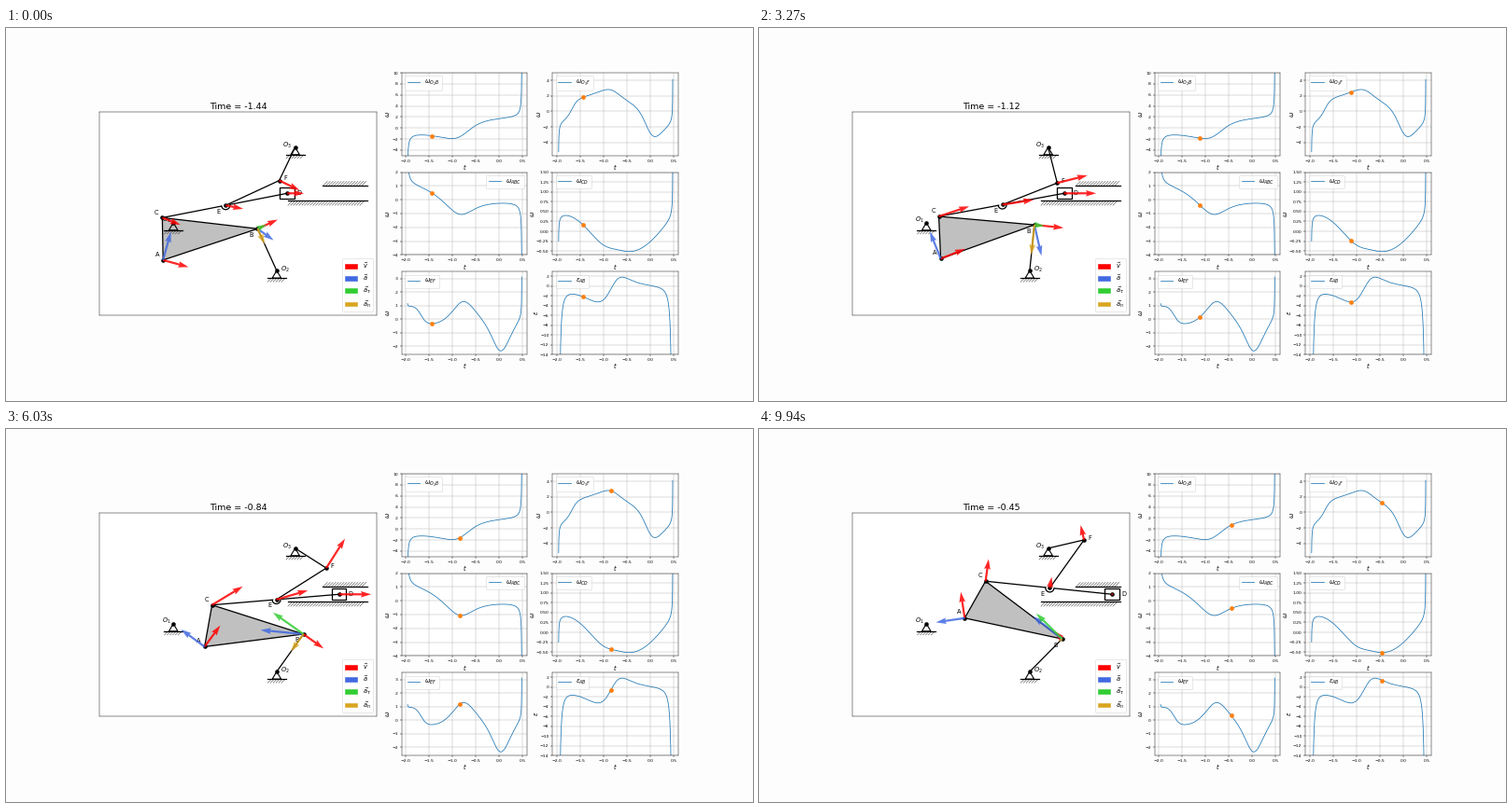
A matplotlib script that plays this animation: 800 px wide and 400 px high, repeating every 9970 ms.

```python
import numpy as np
import matplotlib.pyplot as plt
from matplotlib.animation import FuncAnimation
from matplotlib.collections import LineCollection
from matplotlib.lines import Line2D
from matplotlib.patches import Patch, Polygon, Rectangle

W, H, DPI = 800, 400, 40
FRAMES, LOOP_MS = 329, 9970
T_START, T_STEP = -1.4437, 1 / 330

# Linkage geometry in cm; points are complex numbers.
O1, O2, O3 = 0j, 56 - 26j, 66 + 41j
OMEGA, PHASE = 2, np.pi / 3
O1A, O2B, O3F = 21, 25, 20
AB, AC, BC, CD, CE, EF = 54, 23, 52, 69, 35, 32
SLIDE_Y = 16

plt.rcParams["font.family"] = "DejaVu Sans"
np.seterr(invalid="ignore")


def meet(p, q, rp, rq, side):
    """Intersection of two circles; side +1 lies left of p -> q."""
    d = q - p
    dist = np.abs(d)
    x = (rp**2 - rq**2 + dist**2) / (2 * dist)
    y = np.sqrt(rp**2 - x**2)
    return p + (x + 1j * side * y) * d / dist


def pose(t):
    """Positions of the joints A..F at time t."""
    a = O1 + O1A * np.exp(1j * (OMEGA * t + PHASE))
    b = meet(a, O2, AB, O2B, 1)
    c = meet(a, b, AC, BC, 1)
    drop = SLIDE_Y - c.imag
    d = c.real + np.sqrt(CD**2 - drop**2) + 1j * SLIDE_Y
    e = c + (d - c) * CE / CD
    f = meet(e, O3, EF, O3F, -1)
    return np.array([a, b, c, d, e, f])


def velocity(t, h=1e-5):
    return (pose(t + h) - pose(t - h)) / (2 * h)


def acceleration(t, h=1e-4):
    return (pose(t + h) - 2 * pose(t) + pose(t - h)) / h**2


def spin(arm, arm_vel):
    return (np.conj(arm) * arm_vel).imag / np.abs(arm) ** 2


def rates(t):
    """Angular velocities of O2B, O3F, ABC, CD and EF."""
    a, b, c, d, e, f = pose(t)
    va, vb, vc, vd, ve, vf = velocity(t)
    return np.array([
        spin(b - O2, vb), spin(f - O3, vf), spin(b - a, vb - va),
        spin(d - c, vd - vc), spin(f - e, vf - ve),
    ])


def all_rates(t, h=1e-4):
    eps = (rates(t + h)[2] - rates(t - h)[2]) / (2 * h)
    return np.vstack([rates(t), eps])


def xy(points):
    points = np.atleast_1d(points)
    return np.column_stack([points.real, points.imag])


def px_axes(fig, left, top, width, height):
    return fig.add_axes([left / W, 1 - (top + height) / H, width / W, height / H])


fig = plt.figure(figsize=(W / DPI, H / DPI), dpi=DPI, facecolor="#fefdfe")

# Graphs: label, quantity, y limits, tick step, legend corner
GRAPHS = [
    (r"$\omega_{O_2B}$", r"$\omega$", (-5, 10), 2, "upper left"),
    (r"$\omega_{O_3F}$", r"$\omega$", (-5.68, 4.97), 2, "upper left"),
    (r"$\omega_{ABC}$", r"$\omega$", (-4, 2), 1, "upper right"),
    (r"$\omega_{CD}$", r"$\omega$", (-0.6, 1.5), 0.25, "upper left"),
    (r"$\omega_{EF}$", r"$\omega$", (-2.62, 3.52), 1, "upper left"),
    (r"$\varepsilon_{AB}$", r"$\varepsilon$", (-14, 3), 2, "upper left"),
]

grid_t = np.linspace(-1.9632, 0.4819, 12000)
curves = all_rates(grid_t)
inside = (curves[1] > -5.2) & (curves[1] < 4.5)
grid_t, curves = grid_t[inside], curves[:, inside]

graph_axes = []
for i, (label, quantity, ylim, step, corner) in enumerate(GRAPHS):
    ax = px_axes(fig, (423.6, 585.3)[i % 2], 48 + 106.6 * (i // 2), 134.7, 88.8)
    ax.plot(grid_t, curves[i], label=label, lw=1.4)
    ax.set_xlim(-2.09, 0.6)
    ax.set_ylim(*ylim)
    ax.xaxis.set_major_locator(plt.MultipleLocator(0.5))
    ax.yaxis.set_major_locator(plt.MultipleLocator(step))
    ax.tick_params(labelsize=8)
    ax.set_xlabel("$t$", fontsize=12, labelpad=-1)
    ax.set_ylabel(quantity, fontsize=12, labelpad=0)
    ax.grid(True)
    ax.legend(loc=corner, fontsize=12)
    graph_axes.append(ax)

# The graphs never change, so they are rendered once and kept as a backdrop.
fig.canvas.draw()
backdrop = np.array(fig.canvas.buffer_rgba())
for ax in graph_axes:
    ax.set_visible(False)
fig.figimage(backdrop, zorder=-1)

graph_dots = [
    fig.add_artist(Line2D([0], [0], marker="o", ms=7.5, color="C1",
                          transform=ax.transData, zorder=3))
    for ax in graph_axes
]

# Mechanism
ax = px_axes(fig, 100.2, 90.4, 296.4, 217.2)
ax.set_xlim(-40, 110)
ax.set_ylim(-50, 60)
ax.set_xticks([])
ax.set_yticks([])
title = ax.set_title("", fontsize=17)
LINK = dict(color="black", lw=2.3, solid_capstyle="round")


def ground(x0, x1, y, depth):
    """Horizontal line with hatching; the sign of depth picks the side."""
    ax.plot([x0, x1], [y, y], color="black", lw=2.2, zorder=2)
    low, high = sorted((y, y + depth))
    lean = high - low
    marks = [[(x, low), (x + lean, high)] for x in np.arange(x0, x1 - lean + 0.1, 1.5)]
    ax.add_collection(LineCollection(marks, colors="black", linewidths=0.7, zorder=2))


def support(o, label, dx, dy):
    x, y = o.real, o.imag
    ax.add_patch(Polygon([(x, y), (x - 2.4, y - 4), (x + 2.4, y - 4)],
                         fill=False, lw=2, zorder=2))
    ground(x - 5, x + 5, y - 4, -2.2)
    ax.plot(x, y, "o", color="black", ms=7, zorder=2.6)
    ax.text(x + dx, y + dy, label, fontsize=12, ha="center", va="center", zorder=2.5)


support(O1, "$O_1$", -3.9, 1.6)
support(O2, "$O_2$", 4.6, 0.8)
support(O3, "$O_3$", -4.2, 0.9)
ground(62, 105, 12, -2.6)
ground(81, 105, 20, 2.6)

plate = ax.add_patch(Polygon(np.zeros((3, 2)), facecolor="silver",
                             edgecolor="black", lw=2.3, zorder=1))
rods = [ax.plot([], [], zorder=z, **LINK)[0] for z in (2, 2, 2.2, 2)]
hinge_gap, = ax.plot([], [], "o", color="white", ms=14, zorder=2.1)
hinge, = ax.plot([], [], zorder=2.2, **LINK)
slider = ax.add_patch(Rectangle((0, 0), 8, 6, fill=False, lw=2.3, zorder=2))
joints, = ax.plot([], [], "o", color="black", ms=7, zorder=2.6)

OFFSETS = {"A": (-3.2, 3.2), "B": (-3.3, -3.3), "C": (-3.1, 3.0),
           "D": (6.3, 0), "E": (-3.8, -3.3), "F": (3.1, 1.1)}
names = [ax.text(0, 0, s, fontsize=12, ha="center", va="center", zorder=2.5)
         for s in OFFSETS]


def arrows(count, color, scale, zorder):
    zero = np.zeros(count)
    return ax.quiver(zero, zero, zero, zero, color=color, scale=scale,
                     alpha=0.85, zorder=zorder)


KINDS = [("red", r"$\vec{v}$"), ("royalblue", r"$\vec{a}$"),
         ("limegreen", r"$\vec{a_\tau}$"), ("goldenrod", r"$\vec{a_n}$")]
vectors = [arrows(count, color, scale, 3 + 0.1 * i)
           for i, ((color, _), count, scale)
           in enumerate(zip(KINDS, (6, 2, 1, 1), (440, 800, 800, 800)))]
ax.legend(handles=[Patch(color=color, label=label) for color, label in KINDS],
          loc="lower right", fontsize=12, labelspacing=0.4).set_zorder(5)

times = T_START + T_STEP * np.arange(FRAMES)
places, speeds, accels = pose(times), velocity(times), acceleration(times)
values = all_rates(times)
HALF_TURN = np.exp(1j * np.linspace(np.pi, 2 * np.pi, 20))


def aim(quiver, at, vector):
    at, vector = np.atleast_1d(at), np.atleast_1d(vector)
    quiver.set_offsets(xy(at))
    quiver.set_UVC(vector.real, vector.imag)


def update(n):
    p = places[:, n]
    a, b, c, d, e, f = p
    title.set_text(f"Time = {times[n]:.2f}")

    plate.set_xy(xy(p[:3]))
    for rod, ends in zip(rods, [(O2, b), (c, d), (e, f), (O3, f)]):
        rod.set_data(np.real(ends), np.imag(ends))
    arc = e + 2.3 * HALF_TURN * (d - c) / CD
    hinge.set_data(arc.real, arc.imag)
    hinge_gap.set_data([e.real], [e.imag])
    slider.set_xy((d.real - 4, d.imag - 3))
    joints.set_data(p.real, p.imag)
    for name, q, (dx, dy) in zip(names, p, OFFSETS.values()):
        name.set_position((q.real + dx, q.imag + dy))

    acc = accels[:2, n]
    arm = (b - O2) / O2B
    normal = arm * (acc[1] * np.conj(arm)).real
    aim(vectors[0], p, speeds[:, n])
    aim(vectors[1], p[:2], acc)
    aim(vectors[2], b, acc[1] - normal)
    aim(vectors[3], b, normal)

    for dot, value in zip(graph_dots, values[:, n]):
        dot.set_data([times[n]], [value])
    return []


anim = FuncAnimation(fig, update, frames=FRAMES, interval=LOOP_MS / FRAMES,
                     repeat=True, repeat_delay=0)
plt.show()
```
